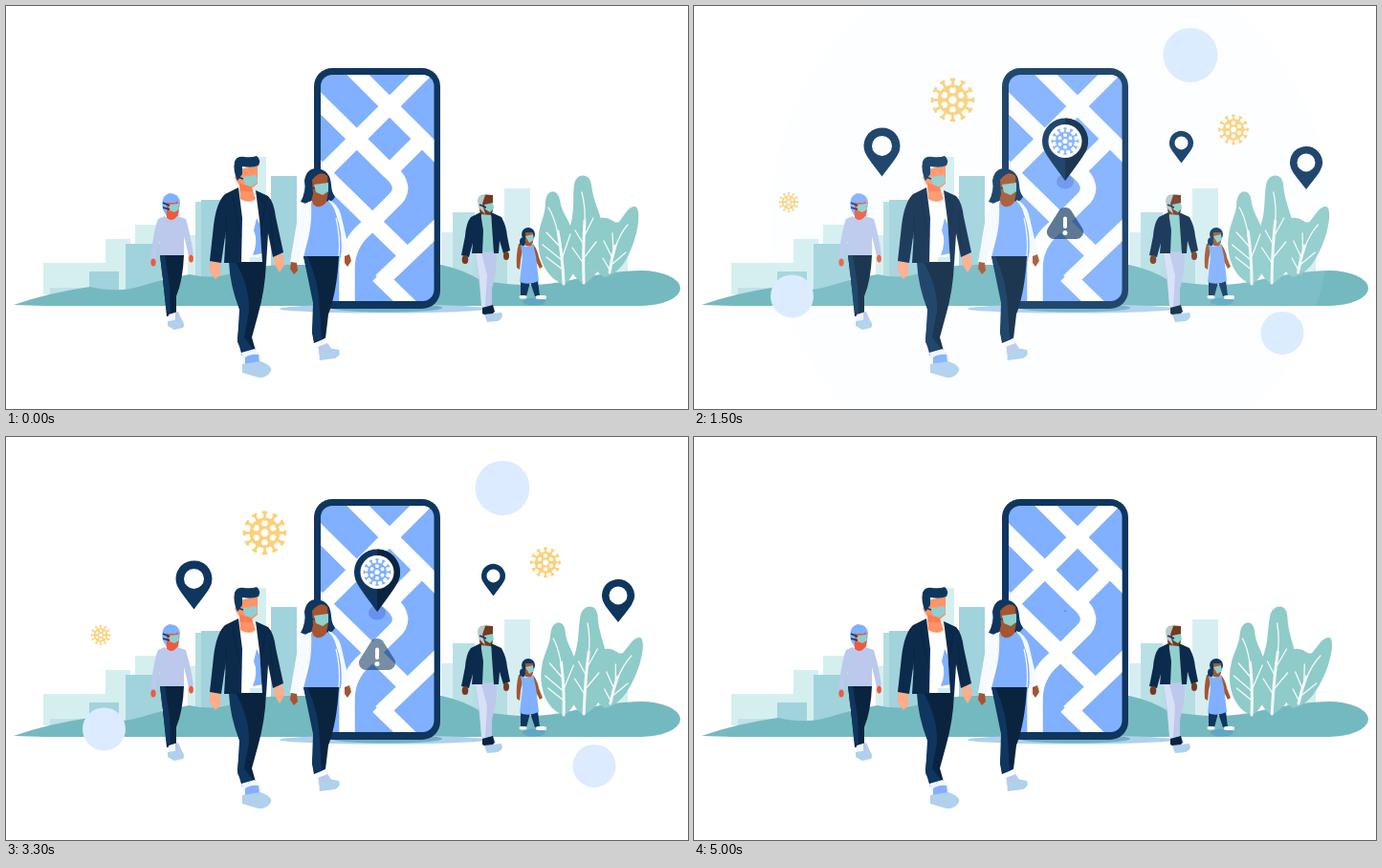
Animation, 713 px wide and 422 px high, one loop 5050 ms. Source, as an HTML page with a canvas:

```html
<!DOCTYPE html>
<html lang="en">
<head>
<meta charset="utf-8">
<title>Walking near the map</title>
<style>
html, body { margin: 0; width: 100%; height: 100%; overflow: hidden; background: #fff; }
canvas { display: block; width: 713px; height: 422px; }
</style>
</head>
<body>
<canvas id="stage" width="713" height="422"></canvas>
<script>
const ctx = document.getElementById('stage').getContext('2d');
const LOOP = 5050;
const NAVY = '#0f365f', DARK = '#0a2440', COAT = '#0c2a4c', BLUE = '#80b0ff', MASK = '#8fd0cf';
const LILAC = '#bcc8ec', SHADE = '#b0d0ec', LEAF = '#8fcbc8', TEAL = '#75b9c0';
const PALE = '#d5efef', MID = '#a1d3dc', AMBER = '#fcd078', BUBBLE = '#dcebff';
const BROWN = '#a5552f', UMBER = '#743a20', PEACH = '#ff9466', CORAL = '#ee5a3a';

const clamp = x => Math.min(1, Math.max(0, x));

// cubic-bezier(.25, .1, .25, 1)
function ease(x) {
  if (x <= 0 || x >= 1) return clamp(x);
  let lo = 0, hi = 1;
  for (let i = 0; i < 20; i++) {
    const u = (lo + hi) / 2, v = 1 - u;
    if (.75 * v * v * u + .75 * v * u * u + u * u * u < x) lo = u; else hi = u;
  }
  const v = 1 - lo;
  return .3 * v * v * lo + 3 * v * lo * lo + lo ** 3;
}

function shape(color, d) {
  ctx.fillStyle = color;
  ctx.fill(new Path2D(d));
}
function line(color, width, d) {
  ctx.strokeStyle = color;
  ctx.lineWidth = width;
  ctx.stroke(new Path2D(d));
}
function box(color, x, y, right, bottom) {
  ctx.fillStyle = color;
  ctx.fillRect(x, y, right - x, bottom - y);
}
function oval(color, x, y, rx, ry = rx) {
  ctx.fillStyle = color;
  ctx.beginPath();
  ctx.ellipse(x, y, rx, ry, 0, 0, 7);
  ctx.fill();
}
function round(color, x, y, w, h, r) {
  ctx.fillStyle = color;
  ctx.beginPath();
  ctx.roundRect(x, y, w, h, r);
  ctx.fill();
}
function scaled(x, y, s, draw) {
  if (s <= 0) return;
  ctx.save();
  ctx.translate(x, y);
  ctx.scale(s, s);
  ctx.translate(-x, -y);
  draw();
  ctx.restore();
}

function city() {
  box(PALE, 39, 269, 125, 302);
  box(PALE, 104, 244, 130, 290);
  box(PALE, 135, 229, 162, 255);
  box(PALE, 190, 240, 204, 290);
  box(PALE, 255, 158, 272, 290);
  box('#bfe2e6', 46, 295, 90, 304);
  box(MID, 87, 278, 118, 304);
  box(MID, 125, 249, 163, 300);
  box('#b5dde2', 198, 205, 206, 290);
  box(MID, 204, 203, 234, 290);
  box(MID, 277, 178, 304, 290);
  box('#d6eef2', 455, 237, 468, 300);
  box('#d6eef2', 521, 191, 548, 300);
  box('#b9e0e5', 467, 216, 490, 300);
  box('#b5dde2', 488, 248, 524, 300);
  box(PALE, 620, 250, 650, 290);
}

function ground() {
  shape(TEAL, 'M8 313 Q45 300 88 294 Q118 301 142 293 Q172 284 192 281 Q214 286 232 281 Q262 270 300 271 L455 271 ' +
    'Q478 276 496 287 Q548 297 590 287 Q635 277 664 277 A41 18.500 0 0 1 664 314 L40 314 Z');
}

function trees(sway) {
  ctx.save();
  ctx.transform(1, 0, -.079 * sway, 1, .079 * sway * 292, 0);
  shape(LEAF, 'M584 291 C566 288 554 262 557 240 C558 226 564 220 564 205 C565 191 577 191 579 203 C581 217 589 224 592 236 C598 256 600 280 584 291Z');
  shape(LEAF, 'M604 291 C584 280 584 250 590 230 C595 213 592 200 594 187 C596 175 610 174 612 187 C614 205 620 213 624 230 C630 255 625 280 604 291Z');
  shape(LEAF, 'M626 284 C606 276 606 226 622 222 C632 220 636 229 641 226 C648 216 652 209 658 210 C664 213 661 235 656 248 C650 265 642 280 626 284Z');
  ctx.lineCap = 'round';
  const white = '#f4fbfb';
  line(white, 3, 'M583 291 Q582 263 577 236 M604 290 Q603 255 605 225 M631 279 Q633 264 637 251');
  line(white, 1.3, 'M577 238 Q573 220 567 211 M580 253 L565 237 M581 266 L561 250 M582 262 L590 239 M582 276 L565 263 ' +
    'M605 227 Q606 211 602 195 M604 242 L614 222 M604 250 L595 235 M604 264 L617 247 M604 270 L592 253 ' +
    'M637 253 Q642 238 650 229 M634 264 L625 246 M633 271 L648 258 M635 256 L634 238 M631 276 L624 264');
  ctx.restore();
}

function phone() {
  oval(SHADE, 394, 317, 108, 4.5);
  oval('#70b0c2', 398, 316, 58, 4.5);
  round(NAVY, 322, 65, 132, 252, 19);
  ctx.save();
  ctx.beginPath();
  ctx.roundRect(329, 72, 118.5, 237, 12);
  ctx.clip();
  box(BLUE, 329, 72, 448, 309);
  ctx.lineCap = 'butt';
  ctx.lineJoin = 'miter';
  line('#fff', 16.5, 'M360 64 L456 160 M444 62 L324 182 M435 139 L402 172 M320 93 L400 172 ' +
    'Q422 190 404 205 L376 233 Q356 250 356.5 276 L356.5 314 M322 166 L416 258 M456 227 L392 288 M389 282 L424 316');
  ctx.restore();
}

function elder() {
  shape(BLUE, 'M164 213 Q161 199 171 196 Q181 196 182 206 L180 220 L169 222Z');
  shape(CORAL, 'M168 204 L179 203 L181 213 L179 221 Q175 229 168 222Z');
  shape(BLUE, 'M166 203 Q172 194 181 203 L177 206 L169 206Z');
  shape(MASK, 'M170 208 L180 207 L181 213 L176 216 L171 214Z');
  line(NAVY, 1.5, 'M164 206 L171 209 M164 211 L171 213');
  shape(LILAC, 'M166 220 Q173 228 179 220 L188 223 Q193 240 196 260 L191 261 L186 241 L186 262 L160 262 L161 245 L156 266 L151 265 Q154 236 159 223Z');
  oval(CORAL, 154, 268.5, 2.6, 4);
  oval(CORAL, 193.5, 264.5, 2.4, 4);
  shape(DARK, 'M161 261 L186 261 Q185 287 178 304 L178 323 L168 325 L165 296Z');
  shape(NAVY, 'M161 261 L166 261 L171 293 L172 322 L168 320Z');
  shape('#f1f5ff', 'M170 323 L180 320 L184 330 L170 332Z');
  shape(LILAC, 'M177 321 L180 320 L184 329 L177 331Z');
  shape(SHADE, 'M169 330 L183 328 Q188 333 185 337 L176 339 L169 335Z');
}

function man() {
  shape(DARK, 'M234 268 L272 268 Q271 298 263 325 L257 347 L261 361 L247 367 L242 349 L245 320Z');
  shape(NAVY, 'M233 268 L240 268 Q255 294 254 320 L249 347 L259 360 L250 368 L242 352 L244 318 Q234 292 233 268Z');
  shape('#f1f5ff', 'M246 363 L260 359 L266 365 L267 373 L249 376Z');
  shape(BLUE, 'M250 368 Q256 364 264 365 L265 373 L250 376Z');
  shape(SHADE, 'M247 375 L266 372 Q279 377 277 382 Q273 390 264 389 L247 384Z');
  shape('#ffad8a', 'M213 267 L224 268 L224 281 L219 286 L213 278Z');
  shape('#ffad8a', 'M280 261 L289 260 L291 271 L286 279 L281 271Z');
  shape('#fff', 'M245 198 L262 198 L270 263 L245 263Z');
  shape(BLUE, 'M262 222 L265 228 L268 259 L258 261 Q264 246 259 235Z');
  shape(PEACH, 'M244 171 L263 167 L263 186 L257 191 L261 202 Q254 208 245 202 L244 188 L239 180Z');
  shape('#ff7d52', 'M244 185 L257 190 L258 194 L245 194Z');
  shape(MASK, 'M247 179 L262 177 L263 184 L257 189 L250 187Z');
  shape(NAVY, 'M242 183 Q237 172 239 163 Q241 157 249 158 Q257 159 262 157 Q267 161 264 167 Q257 170 247 168 L247 176Z');
  line(NAVY, 1.4, 'M242 179 L248 181');
  shape(COAT, 'M243 190 L229 197 Q220 205 217 230 L213 267 L225 269 L230 235 L228 269 L246 269 L247 222Z');
  shape(COAT, 'M261 193 L274 199 Q280 205 282 221 L290 258 L279 263 L274 238 L272 270 L268 268 L265 224Z');
  line(DARK, 1, 'M237 199 L242 227 L246 242 M276 217 L280 256 M230 220 L230 244 M263 199 L271 206 L267 232');
}

function woman() {
  shape(NAVY, 'M308 205 Q314 194 312 183 Q314 170 325 170 Q339 172 340 187 Q340 194 344 200 Q340 208 324 207 Q314 208 308 205Z');
  shape(BROWN, 'M320 182 Q329 171 336 178 L337 194 L335 205 L340 208 L331 218 L318 208 L321 197Z');
  shape(MASK, 'M322 187 L337 185 L337 194 L331 198 L324 195Z');
  line(NAVY, 1, 'M318 190 L323 191');
  shape('#f7faff', 'M320 204 Q309 206 305 221 L297 268 L304 270 L314 243 L324 232Z');
  shape('#f7faff', 'M337 203 Q346 206 350 218 L360 261 L353 264 L343 234Z');
  shape(BLUE, 'M319 205 Q327 216 336 204 Q342 207 345 218 Q353 238 350 263 L311 263 L317 239 Q320 224 319 205Z');
  line('#f7faff', 1.2, 'M345 222 Q350 242 348 262');
  shape(BROWN, 'M298 268 L304 269 L305 277 L301 281 L297 275Z');
  shape(BROWN, 'M354 262 L359 260 L361 267 L357 273 L354 269Z');
  shape(DARK, 'M311 262 L348 262 Q346 299 337 323 L334 348 L322 353 L320 342 L323 314Z');
  shape(NAVY, 'M311 262 L315 262 Q328 291 328 319 L330 349 L322 351 L320 340 L321 311Z');
  shape('#f7faff', 'M324 354 L335 347 L341 359 L326 364Z');
  shape(LILAC, 'M326 357 L336 353 L341 360 L327 364Z');
  shape(SHADE, 'M325 362 Q335 356 348 360 Q351 365 344 369 L328 371Z');
  line('#f7faff', 2, 'M325 355 L327 369');
}

function neighbor() {
  shape(UMBER, 'M494 201 Q496 196 509 198 L509 214 L506 225 L497 225 L495 213Z');
  shape('#b8cacb', 'M493 204 Q493 197 501 198 L498 207 L501 218 L494 211Z');
  shape(MASK, 'M500 208 L509 206 L510 212 L506 216 L501 213Z');
  line(NAVY, 1.6, 'M495 208 L502 211');
  shape(MASK, 'M497 218 L507 219 L512 259 L496 260Z');
  shape(LILAC, 'M491 258 L513 257 Q513 280 508 296 L508 316 L498 318 L495 292Z');
  shape('#d8e0f6', 'M491 258 L497 258 L503 282 L501 315 L497 315 L495 286Z');
  shape(COAT, 'M496 216 L486 221 Q481 227 480 241 L476 261 L484 263 L488 248 L487 259 L498 259 L499 235Z');
  shape(COAT, 'M507 216 L518 221 Q523 230 524 241 L527 256 L520 259 L516 246 L515 259 L510 259Z');
  oval(UMBER, 480, 265.5, 3.3, 4.5);
  oval(UMBER, 523, 261.5, 3, 4.5);
  shape(DARK, 'M498 316 L509 313 L511 320 L505 326 L498 322Z');
  shape(SHADE, 'M500 323 L518 321 Q521 327 514 330 L503 331Z');
}

function child() {
  oval('#5fa8c4', 552, 309.5, 12, 4);
  shape(BROWN, 'M536 249 L541 249 L538 266 L537 276 L534 274 Q533 260 536 249Z');
  shape(BROWN, 'M551 249 Q556 256 557 263 L561 273 L558 275 L553 265Z');
  shape(NAVY, 'M538 287 L556 287 L558 304 L553 304 L548 289 L544 304 L538 304Z');
  oval(NAVY, 546, 239, 7, 7);
  oval(NAVY, 540, 247, 3, 4.5);
  shape(BROWN, 'M543 237 L551 237 L551 247 L549 252 L543 251Z');
  shape(MASK, 'M543 241 L551 239 L552 245 L547 248Z');
  shape(BLUE, 'M538 250 Q546 255 551 249 L554 262 L557 288 Q546 293 537 289 L540 263Z');
  round('#f7faff', 536.5, 303, 8, 3.5, 1.7);
  round('#f7faff', 554, 303, 11, 4, 1.8);
}

function virus(color, x, y, r) {
  ctx.save();
  ctx.translate(x, y);
  ctx.scale(r, r);
  ctx.lineCap = 'round';
  ctx.strokeStyle = color;
  ctx.lineWidth = .12;
  ctx.beginPath();
  for (let i = 0; i < 12; i++) {
    const a = i * Math.PI / 6, c = Math.cos(a), s = Math.sin(a);
    ctx.moveTo(c * .6, s * .6);
    ctx.lineTo(c * .9, s * .9);
    ctx.moveTo(c * .93 - s * .07, s * .93 + c * .07);
    ctx.lineTo(c * .93 + s * .07, s * .93 - c * .07);
  }
  ctx.stroke();
  const ring = (cx, cy, rad) => {
    ctx.moveTo(cx + rad, cy);
    ctx.arc(cx, cy, rad, 0, 7);
    ctx.closePath();
  };
  ctx.fillStyle = color;
  ctx.beginPath();
  ring(0, 0, .69);
  ring(0, 0, .18);
  for (let i = 0; i < 6; i++) {
    const a = (i + .5) * Math.PI / 3;
    ring(.44 * Math.cos(a), .44 * Math.sin(a), .14);
  }
  ctx.fill('evenodd');
  ctx.restore();
}

// Teardrop with its head at (x, y) and its point at height tip
function drop(x, y, r, tip) {
  const k = y + r * .62;
  ctx.beginPath();
  ctx.arc(x, y, r, Math.PI * .82, Math.PI * .18);
  ctx.quadraticCurveTo(x + r * .72, k + r * .15, x, tip);
  ctx.quadraticCurveTo(x - r * .72, k + r * .15, x + r * Math.cos(Math.PI * .82), y + r * Math.sin(Math.PI * .82));
  ctx.closePath();
}
function pin(x, y, r, tip, hole) {
  drop(x, y, r, tip);
  ctx.moveTo(x + hole, y);
  ctx.arc(x, y, hole, 0, 7);
  ctx.fillStyle = NAVY;
  ctx.fill('evenodd');
}

function mainPin() {
  oval('rgba(91,124,224,.62)', 388, 184, 9, 7.5);
  drop(388, 141.5, 24, 183);
  ctx.fillStyle = NAVY;
  ctx.fill();
  ctx.save();
  ctx.clip();
  box(DARK, 388, 110, 415, 185);
  ctx.restore();
  oval('#fff', 388, 141.5, 17.5);
  virus(BLUE, 388, 141.5, 14.5);
}

function alertSign(alpha) {
  ctx.globalAlpha = alpha;
  ctx.fillStyle = NAVY;
  ctx.beginPath();
  ctx.moveTo(388, 244);
  ctx.arcTo(413.3, 244, 388, 204.5, 7.5);
  ctx.arcTo(388, 204.5, 362.7, 244, 7.5);
  ctx.arcTo(362.7, 244, 388, 244, 7.5);
  ctx.fill();
  ctx.globalAlpha = 1;
  ctx.lineCap = 'round';
  line('#fff', 4, 'M388 222.5 L388 231');
  oval('#fff', 388, 237.5, 2.5);
}

function floaters(dy) {
  ctx.translate(0, dy);
  oval(BUBBLE, 519, 48, 28.5);
  oval(BUBBLE, 102.5, 300.5, 22.5);
  oval(BUBBLE, 615, 339, 22.5);
  virus(AMBER, 270.5, 95, 23);
  virus(AMBER, 564, 126, 16);
  virus(AMBER, 99, 202, 10.5);
  pin(196.5, 143, 19, 175, 10.5);
  pin(509.5, 140, 12.5, 161, 7);
  pin(640, 160.5, 17, 188.5, 9.5);
}

function ping(t) {
  const age = t - 770;
  if (age <= 0 || age >= 1000) return;
  const r = .4 * age;
  ctx.globalAlpha = .34 * (1 - age / 1000);
  oval('#ddecff', 322.5 + .172 * r, 197 + .088 * r, r);
  ctx.globalAlpha = 1;
}

function draw(t) {
  const wave = (1 - Math.cos(t * Math.PI / 1000)) / 2;
  const leave = ease((5020 - t) / 500);
  const pinSize = Math.min(ease((t - 690) / 500), leave);
  const size = Math.min(ease((t - 1005) / 500), leave);

  ctx.clearRect(0, 0, 713, 422);
  city();
  ground();
  trees(wave);
  phone();
  elder();
  woman();
  man();
  neighbor();
  child();
  scaled(388, 183, pinSize, mainPin);
  scaled(388, 231, size, () => alertSign(1 - .55 * wave));
  ctx.globalAlpha = size;
  scaled(357, 217.5, size, () => floaters(6.8 * wave));
  ctx.globalAlpha = 1;
  ping(t);
}

const start = performance.now();
function tick() {
  draw((performance.now() - start) % LOOP);
  requestAnimationFrame(tick);
}
tick();
</script>
</body>
</html>
```
